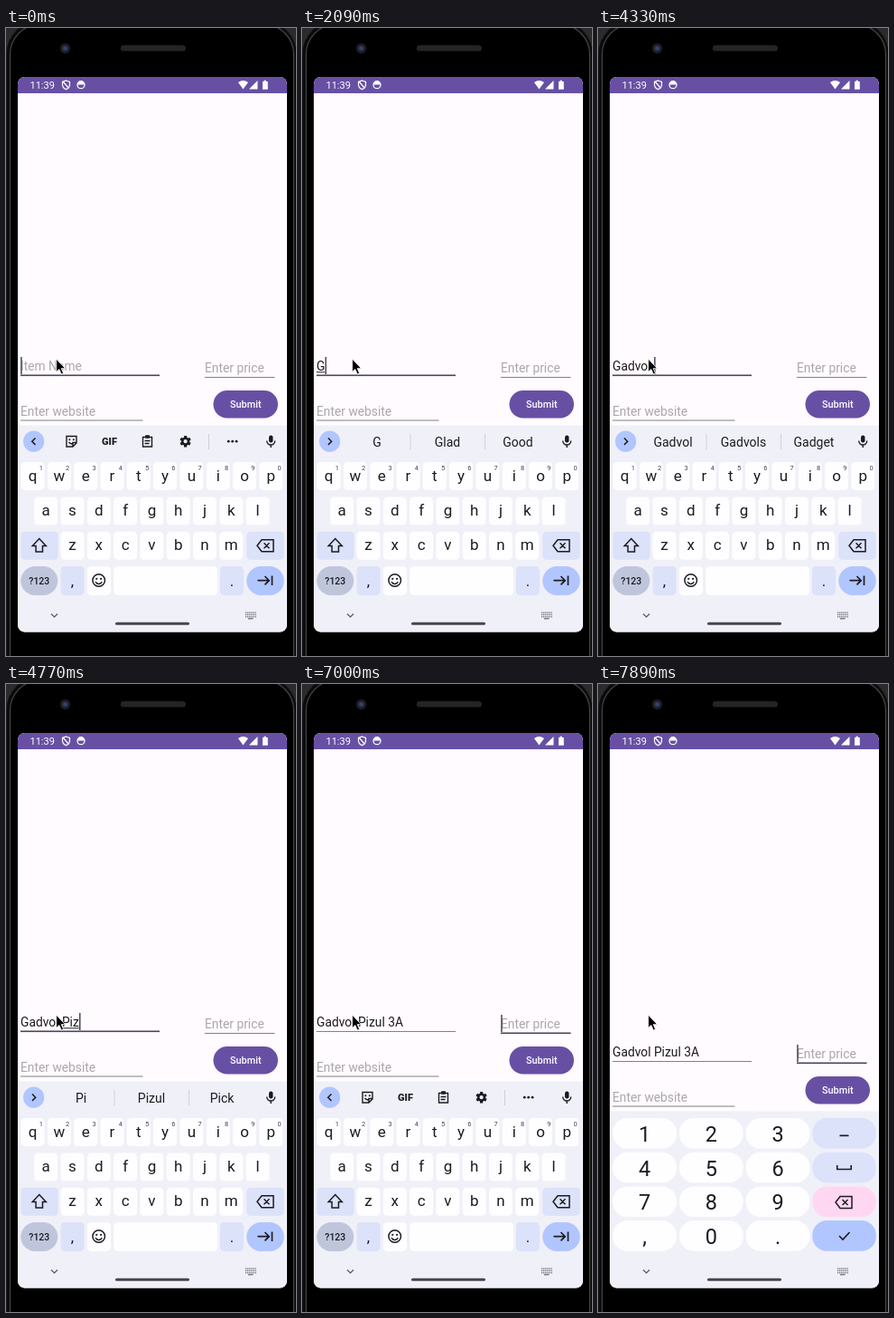
These frames come from a looping animation (321x693 px, 8 s). An HTML page:

```html
<!DOCTYPE html>
<html lang="en">
<head>
<meta charset="utf-8">
<title>Typing on a phone</title>
<style>
  html, body { margin: 0; width: 100%; height: 100%; overflow: hidden; background: #1b1b1d; }
  svg { display: block; width: 321px; height: 693px; }
  text { font-family: Roboto, sans-serif; white-space: pre; }
</style>
</head>
<body>
<svg id="stage" viewBox="0 0 321 693" xmlns="http://www.w3.org/2000/svg"></svg>
<script>
const INK = '#1c1b1f', HINT = '#aaa7ab', PURPLE = '#6750a4', BLUE = '#b1c5ff',
      TINT = '#dce2f9', WHITE = '#fefdff', PANEL = '#f0f0f8', FIELD = 13.8;

// time, typed text, start of the underlined word (-1: none), suggestions, caret, mode
const steps = [
  [0,    '', -1, '', 1],
  [300,  '', -1, '', 0],
  [750,  '', -1, '', 1],
  [1350, '', -1, '', 0],
  [1800, '', -1, '', 1, 'caps'],
  [1950, 'G', 0, '', 1],
  [2090, 'G', 0, 'G|Glad|Good', 1],
  [2540, 'Ga', 0, 'G|Glad|Good', 1],
  [2690, 'Gad', 0, 'Ga|Game|Gave', 1],
  [2840, 'Gad', 0, 'Gad|Gadvol|Glad', 1],
  [3140, 'Gadv', 0, 'Gad|Gadvol|Glad', 1],
  [3290, 'Gadvo', 0, 'Gadv|Gadvol|Gadvols', 1],
  [3430, 'Gadvol', 0, 'Gadvo|Gadvol|Gadvols', 1],
  [3580, 'Gadvol', 0, 'Gadvol|Gadvols|Gadget', 1],
  [4030, 'Gadvol', 0, 'Gadvol|Gadvols|Gadget', 0],
  [4330, 'Gadvol ', -1, 'Gadvol|Gadvols|Gadget', 1],
  [4480, 'Gadvol P', 7, 'is|and|for', 1],
  [4620, 'Gadvol Pi', 7, 'P|Play|Phone', 1],
  [4770, 'Gadvol Piz', 7, 'Pi|Pizul|Pick', 1],
  [4920, 'Gadvol Piz', 7, 'Piz|Pizul|Pizza', 1],
  [5070, 'Gadvol Pizu', 7, 'Piz|Pizul|Pizza', 1],
  [5210, 'Gadvol Pizul', 7, 'Pizu|Pizul|Pizuls', 1],
  [5360, 'Gadvol Pizul', 7, 'Pizul|Pizuls|Pizulated', 1],
  [5510, 'Gadvol Pizul ', 7, 'Pizul|Pizuls|Pizulated', 1],
  [5660, 'Gadvol Pizul ', -1, 'is|and|case', 1],
  [6110, 'Gadvol Pizul 3', -1, 'is|and|case', 1],
  [6400, 'Gadvol Pizul 3A', -1, '', 1],
  [7000, 'Gadvol Pizul 3A', -1, '', 1, 'price'],
  [7150, 'Gadvol Pizul 3A', -1, '', 1, 'pad'],
  [7290, 'Gadvol Pizul 3A', -1, '', 0, 'pad'],
  [7890, 'Gadvol Pizul 3A', -1, '', 1, 'pad']
];
const LOOP = 8000;

const pen = document.createElement('canvas').getContext('2d');
const widthOf = s => { pen.font = FIELD + 'px Roboto, sans-serif'; return pen.measureText(s).width; };

const rect = (x, y, w, h, fill, r = 0) =>
  `<rect x="${x}" y="${y}" width="${w}" height="${h}" rx="${r}" fill="${fill}"/>`;
const dot = (x, y, r, fill) => `<circle cx="${x}" cy="${y}" r="${r}" fill="${fill}"/>`;
const line = (d, color = INK, w = 1.5, fill = 'none') =>
  `<path d="${d}" stroke="${color}" stroke-width="${w}" fill="${fill}"/>`;
const shape = (d, fill) => `<path d="${d}" fill="${fill}"/>`;
const label = (s, x, y, size, fill = INK, anchor = 'middle', weight = 400) =>
  `<text x="${x}" y="${y}" font-size="${size}" fill="${fill}" text-anchor="${anchor}" font-weight="${weight}">${s}</text>`;
const ring = (x, y, r, w = 1.5, color = INK) =>
  `<circle cx="${x}" cy="${y}" r="${r}" fill="none" stroke="${color}" stroke-width="${w}"/>`;

function phone() {
  return rect(0, 0, 321, 693, '#2b2b2e')
    + '<rect x="2" y="-7" width="318" height="760" rx="36" fill="#000" stroke="#0c0c0d" stroke-width="3"/>'
    + '<rect x="4.5" y="-4" width="314" height="760" rx="33" fill="#000" stroke="#444447" stroke-width="1.3"/>'
    + dot(65.5, 22.5, 5.5, '#1d202b') + dot(65.5, 22.5, 2.5, '#34426a')
    + rect(127, 19, 72, 6.5, '#242425', 3.2)
    + rect(13, 54, 298, 612.5, '#fffbfe', 8)
    + shape('M13 72V62a8 8 0 0 1 8-8H303a8 8 0 0 1 8 8V72Z', PURPLE)
    + label('11:39', 26.5, 67, 11, '#fff', 'start')
    + line('M66.5 58l4 1.5v3q0 3.5-4 5.3q-4-1.8-4-5.3v-3zM63.5 59.5l6 7', '#fff', 1.2)
    + ring(83, 62.7, 4, 1.3, '#fff') + shape('M79.5 60.5q3.5-4 7 0v2h-7z', '#fff')
    + shape('M257 60q5.5-4 11 0l-5.5 7.5z', '#fff')
    + shape('M278.5 58v9.5h-9.5z', '#fff')
    + shape('M284 59h1.5v-1.2h2.5V59h1.8v8.7H284z', '#fff');
}

function form(text, mark, caret, inPrice) {
  const end = 16 + widthOf(text), thin = '#858087', thick = '#49455c';
  const rule = (x, y, w, on) => rect(x, on ? y - .5 : y, w, on ? 1.6 : 1, on ? thick : thin);
  let out = label(text || 'Item Name', 16, 378, FIELD, text ? INK : HINT, 'start');
  if (mark >= 0) {
    const from = 16 + widthOf(text.slice(0, mark));
    out += rect(from, 379.3, 16 + widthOf(text.trimEnd()) - from, 1, INK);
  }
  out += label('Enter price', 220, 380, FIELD, HINT, 'start')
    + label('Enter website', 16, 427.5, FIELD, HINT, 'start')
    + rule(16, 383, 154, !inPrice) + rule(220, 385, 77.5, inPrice) + rule(16, 432.5, 135.5, false)
    + rect(229.5, 400, 71.5, 30.5, PURPLE, 15.25)
    + label('Submit', 265.3, 419.3, 10.9, '#fff', 'middle', 500);
  if (caret) out += inPrice ? rect(220.2, 365, 1.5, 19, thick) : rect(end + .2, 363, 1.5, 19, thick);
  return out;
}

function strip(words) {
  let out = dot(30.7, 456.2, 11.6, BLUE)
    + line(words ? 'M29 452.5l3.7 3.7-3.7 3.7' : 'M32.5 452.5l-3.7 3.7 3.7 3.7')
    + rect(291, 449.5, 4.5, 8, INK, 2.2) + line('M288.7 455.5a4.5 4.5 0 0 0 9 0M293.2 460v3', INK, 1.4);
  if (words) {
    words.split('|').forEach((w, i) => out += label(w, 83 + 78 * i, 461.7, 14));
    return out + rect(119.5, 448, 1, 17, '#cfd0d9') + rect(202, 448, 1, 17, '#cfd0d9');
  }
  // toolbar icons, left to right
  out += line('M67 450.5h11v7.5l-4 4h-7zM78 457.5h-4v4.5M69.5 457q2.5 3 4.5 1', INK, 1.4)
    + dot(70.3, 454.3, 1, INK) + dot(74.8, 454.3, 1, INK)
    + label('GIF', 114.5, 460.2, 11, INK, 'middle', 800)
    + line('M151.5 451.5h10v10.5h-10zM153.5 455.5h6M153.5 458.5h5', INK, 1.4)
    + rect(154, 449.2, 5, 3.5, INK, 1);
  for (let a = 0; a < 360; a += 60)
    out += `<rect x="197" y="450" width="3.2" height="3.5" rx=".5" transform="rotate(${a} 198.6 456.2)" fill="${INK}"/>`;
  out += ring(198.6, 456.2, 3.4, 2.6) + rect(224, 448, 1, 17, '#cfd0d9');
  for (let i = -1; i < 2; i++) out += dot(250.7 + 4.4 * i, 456.2, 1.4, INK);
  return out;
}

const erase = (x, y) => line(`M${x - 9} ${y}l5-6.5h13v13h-13zM${x - 1.5} ${y - 3}l6 6m0-6l-6 6`);

function letters(caps) {
  const pitch = 29.3;
  let out = '';
  [['qwertyuiop', 29.6, 479], ['asdfghjkl', 44.2, 517.5], ['zxcvbnm', 73.5, 555.7]].forEach(([row, x0, y]) =>
    [...row].forEach((ch, i) => {
      const x = x0 + pitch * i;
      out += rect(x - 13, y, 26, 31, WHITE, 4.5) + label(caps ? ch.toUpperCase() : ch, x, y + 20.5, 17);
      if (row.length === 10) out += label((i + 1) % 10, x + 9.3, y + 8.5, 7.5, '#46464f');
    }));
  return out
    + rect(16.3, 555.7, 41.5, 31, TINT, 4.5) + rect(266.3, 555.7, 41.5, 31, TINT, 4.5)
    + line('M36.8 563.5l7.5 8h-3.8v6.5h-7.4v-6.5h-3.8z', INK, 1.5, caps ? INK : 'none')
    + erase(287, 571.3)
    + rect(16.3, 594, 41, 32, '#bfc6dc', 16) + label('?123', 36.8, 613.7, 10.5, INK, 'middle', 500)
    + rect(60.7, 594, 26, 32, TINT, 4.5) + label(',', 73.5, 616, 17)
    + rect(90, 594, 26, 32, WHITE, 4.5) + ring(102.7, 609.5, 6.8)
    + dot(100.3, 607.8, 1.1, INK) + dot(105.1, 607.8, 1.1, INK) + line('M99 611.2q3.7 4.5 7.4 0', INK, 1.4)
    + rect(119.2, 594, 115, 32, WHITE, 4.5)
    + rect(237, 594, 26, 32, TINT, 4.5) + label('.', 250, 616, 17)
    + rect(266.3, 594, 41.5, 32, BLUE, 16)
    + line('M278.5 609.7h12M286.5 605l4.7 4.7-4.7 4.7M294.5 604.5v10.5', INK, 1.7);
}

function numbers() {
  const fills = [TINT, TINT, '#ffd7f3', BLUE];
  let out = '';
  ['123', '456', '789', ',0.'].forEach((row, j) => {
    const y = 479 + 37.7 * j;
    [...row].forEach((ch, i) =>
      out += rect(16.3 + 73.7 * i, y, 70.7, 33.7, WHITE, 16) + label(ch, 51.6 + 73.7 * i, y + 26, 23.5));
    out += rect(237.3, y, 70.5, 33.7, fills[j], 16);
  });
  return out + rect(267.5, 497.5, 10, 1.7, INK)
    + line('M264.7 531v4.5h15.5V531', INK, 1.6)
    + erase(272, 572) + line('M267 609l4 4 7.5-8', INK, 1.6);
}

function nav() {
  let out = line('M50 646.5l3.5 3.5 3.5-3.5', '#55555c', 1.2) + rect(121, 655.7, 82, 3, '#46464c', 1.5);
  for (let j = 0; j < 3; j++)
    for (let i = 0; i < 6; i++) out += rect(265 + 2.1 * i, 644.5 + 2.3 * j, 1.3, 1.3, '#66666d');
  return out + rect(268, 651.2, 5.5, 1.2, '#66666d');
}

const panel = top => shape(`M13 ${top}H311V658.5a8 8 0 0 1-8 8H21a8 8 0 0 1-8-8Z`, PANEL);
const pointer = line('M55.7 365.2v14.3l3.2-2.9 2.4 5.4 2.3-1-2.4-5.3h4.4z', '#fff', .8, '#000');

const stage = document.getElementById('stage');
const base = phone();

function draw([, text, mark, words, caret, mode]) {
  const pad = mode === 'pad', fields = form(text, mark, caret, pad || mode === 'price');
  stage.innerHTML = base
    + `<g transform="translate(0 ${pad ? 33 : 0})">${fields}</g>`
    + panel(pad ? 471.5 : 438.5)
    + (pad ? numbers() : strip(words) + letters(mode === 'caps'))
    + nav() + pointer;
}

let shown;
function tick() {
  const t = performance.now() % LOOP;
  const step = steps.findLast(s => s[0] <= t);
  if (step !== shown) draw(shown = step);
  requestAnimationFrame(tick);
}
tick();
</script>
</body>
</html>
```
